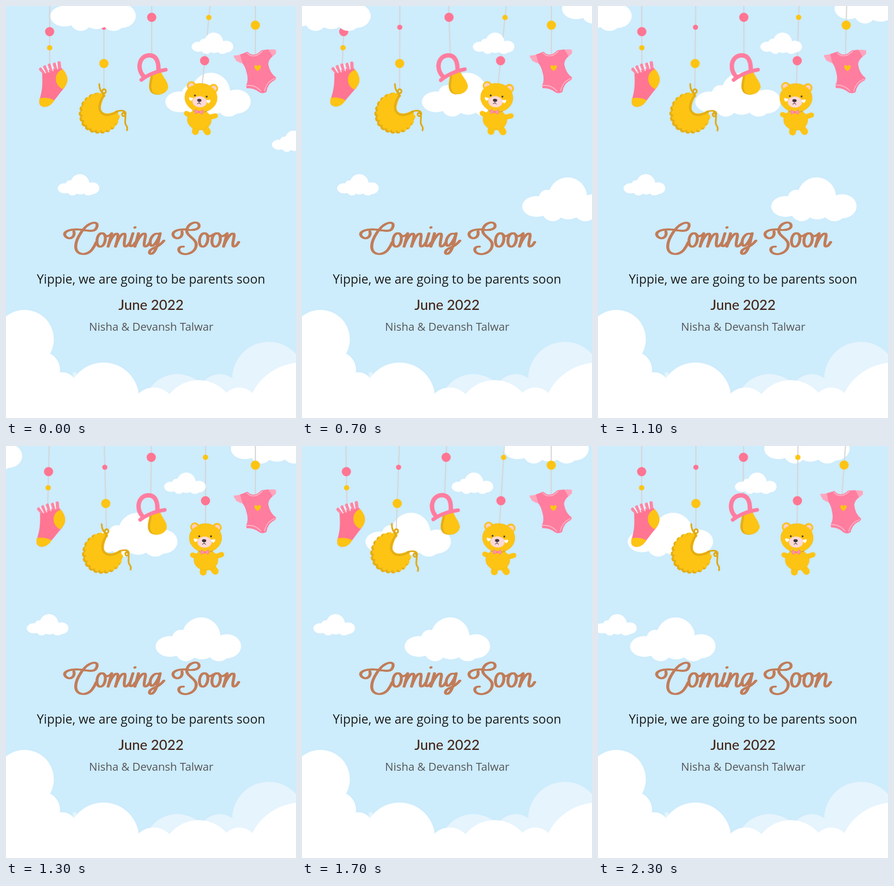
Recreate the animation shown at these times as an HTML page. Size 628 by 892 pixels, loop 2.4 s.

```html
<!DOCTYPE html>
<html lang="en">
<head>
<meta charset="utf-8">
<title>Coming Soon</title>
<style>
  html, body { margin: 0; width: 100%; height: 100%; overflow: hidden; background: #cdecfc; }
  svg { display: block; width: 628px; height: 892px; }
  text { font-family: "Open Sans", "Noto Sans", sans-serif; font-weight: 500; text-anchor: middle; }

  .white { fill: #fff; }
  .haze { fill: #e5f4fd; }
  .pink { fill: #ff7592; }
  .rose { fill: #ff7d9f; }
  .blush { fill: #ffa5bd; }
  .gold { fill: #fdc414; }
  .amber { fill: #e4ae15; }
  .line { fill: none; stroke-linecap: round; stroke-linejoin: round; }
  .string { stroke: #d5d5d6; stroke-width: 2.4; }
  .script { stroke: #c17c59; stroke-width: 3.8; }

  .drift { animation: drift 2400ms steps(24) infinite; }
  @keyframes drift { to { transform: translateX(var(--d)); } }

  .blink { animation: blink 2400ms step-end infinite; }
  @keyframes blink { 0% { opacity: 1; } 4.166%, 100% { opacity: 0; } }

  .toy { transform-origin: var(--pivot); animation: swing 2400ms infinite; }
  @keyframes swing {
    0%      { transform: rotate(var(--a0)); animation-timing-function: steps(3); }
    12.5%   { transform: rotate(var(--a1)); animation-timing-function: steps(4); }
    29.166% { transform: rotate(var(--a2)); animation-timing-function: steps(2); }
    37.5%   { transform: rotate(var(--a3)); animation-timing-function: steps(4); }
    54.166% { transform: rotate(var(--a4)); animation-timing-function: steps(4); }
    70.833% { transform: rotate(var(--a5)); animation-timing-function: steps(6); }
    95.833%, 100% { transform: rotate(var(--a6)); }
  }
  #sock     { --pivot: 94.5px -40px; --a0: 0deg; --a1: 5.1deg; --a2: 2.5deg; --a3: -1.8deg; --a4: 1.4deg; --a5: -.95deg; --a6: 0deg; }
  #bib      { --pivot: 212px -30px; --a0: 0deg; --a1: -1.95deg; --a2: .2deg; --a3: 2.8deg; --a4: -1.5deg; --a5: 2.15deg; --a6: 0deg; }
  #pacifier { --pivot: 315.5px -60px; --a0: 0deg; --a1: -1.95deg; --a2: -1.95deg; --a3: -1deg; --a4: .65deg; --a5: 2.3deg; --a6: .35deg; }
  #bear     { --pivot: 432px 99px; --a0: 5.6deg; --a1: 7.7deg; --a2: 5.9deg; --a3: 3.8deg; --a4: 0deg; --a5: 3.5deg; --a6: .6deg; }
  #onesie   { --pivot: 540px -60px; --a0: 0deg; --a1: -1.9deg; --a2: 0deg; --a3: 2.9deg; --a4: 0deg; --a5: .15deg; --a6: 4deg; }
</style>
</head>
<body>
<svg viewBox="0 0 628 892">
  <defs>
    <g id="cloud" class="white">
      <ellipse cx="31" cy="63" rx="31" ry="22.5"/>
      <circle cx="54" cy="45" r="18"/>
      <ellipse cx="98.5" cy="43" rx="42" ry="43"/>
      <ellipse cx="154" cy="62.5" rx="31" ry="26"/>
      <ellipse cx="66" cy="70" rx="24" ry="25"/>
      <ellipse cx="100" cy="65" rx="30" ry="26"/>
      <ellipse cx="137" cy="68" rx="27" ry="27"/>
    </g>
    <use id="puff" href="#cloud" transform="scale(.487)"/>
    <path id="heart" d="M0 7C-4 4-7 1-7-3C-7-7-1-7 0-3C1-7 7-7 7-3C7 1 4 4 0 7Z"/>
    <path id="frill" class="line" stroke-dasharray="0 11" d="M207 195C190 190 166 203 164 233C165 260 184 271 204 270C224 270 239 256 239 236"/>
    <path id="o" d="M208 492C195 492 193 521 204 521C216 521 220 492 208 492M213 495Q219 502 228 494"/>
    <path id="n" d="M287 492L279 521C285 504 295 490 301 493C305 497 296 515 300 520Q305 523 312 511"/>
    <g id="lettering">
      <path d="M147 488C150 500 139 507 130 500C120 490 136 482 160 484C180 487 191 489 195 482C200 473 197 468 188 469.500C170 473 150 505 151 522C152 539 172 541 184 530Q191 522 195 512"/>
      <use href="#o"/>
      <path d="M229 492L221 521C226 505 235 491 241 493C245 496 240 510 237 521C243 504 250 491 257 493C261 497 253 514 257 520Q262 523 269 511"/>
      <path d="M275 492L269 511C266 522 272 524 280 512M279 480L279.500 479"/>
      <use href="#n"/>
      <path d="M332 494C320 488 309 506 313 517C318 526 330 506 334 492C330 510 326 530 317 536C308 539 308 529 320 524Q333 519 342 508"/>
      <path d="M381 488C384 500 372 507 364 500C355 489 372 482 392 484C409 487 420 482 418 474C415 464 397 469 392 482C387 498 412 502 412 517C411 533 393 540 381 536C370 531 373 520 384 521"/>
      <use href="#o" x="222"/>
      <use href="#o" x="249"/>
      <use href="#n" x="192"/>
    </g>
  </defs>

  <!-- clouds behind the toys -->
  <use class="drift" href="#cloud" x="345" y="144.5" style="--d:-293px"/>
  <use class="drift" href="#cloud" x="652" y="-57" style="--d:-305px"/>
  <use class="drift" href="#cloud" x="655" y="371" style="--d:-611px"/>
  <use class="drift" href="#puff" x="112" y="364" style="--d:-123.5px"/>
  <use class="blink" href="#puff" x="576" y="269.5"/>

  <g id="sock" class="toy">
    <path class="line string" d="M94.5-50V128"/>
    <circle class="pink" cx="94.5" cy="55.5" r="10"/>
    <circle class="gold" cx="94.5" cy="90.5" r="5.8"/>
    <path class="pink" d="M78 143L118 132Q131 144 133 157C134 168 126 178 118 187Q105 204 99 211Q91 219 82 218.500Q72 217 72 208C74 192 81 186 78 143Z"/>
    <path class="line" stroke="#ff86a4" stroke-width="7" d="M75 137L81 143M84 132L89 141M94 128L98 138M105 126L108 135M115 123L116 133"/>
    <path class="line" stroke="#fff" stroke-width="1.800" d="M79 135L86 145M88 131L93 143M98 127L102 140M109 124L112 136"/>
    <path class="gold" d="M72.500 200Q88 196 105 204Q96 219 82 218.500Q72 217 72 208Z"/>
    <path class="gold" d="M123 137C108 142 104 159 112 171Q116 177 123 180Q134 169 133 157Q131 145 123 137Z"/>
  </g>

  <g id="bib" class="toy">
    <path class="line string" d="M212-40V181"/>
    <circle class="pink" cx="212" cy="46" r="5.6"/>
    <circle class="gold" cx="212" cy="124.500" r="10"/>
    <use href="#frill" stroke="#e4ae15" stroke-width="13"/>
    <use href="#frill" stroke="#fdc414" stroke-width="10" x="3" y="-2"/>
    <path class="gold" d="M213 191C200 187 188 191 182 198C168 203 164 218 167 235C168 252 178 266 193 267C205 270 217 269 225 263C236 257 242 249 242 238Q245 229 240 226C226 234 212 236 206 225C204 212 212 202 213 191Z"/>
    <path class="line" stroke="#e4ae15" stroke-width="5" d="M211 195C204 206 200 218 204 227C210 239 226 238 240 229"/>
    <path class="line" stroke="#dfa914" stroke-width="3.600" d="M202 169C202 180 207 189 212 189C218 188 217 180 212 180C206 182 209 190 213 195M238 229C253 223 263 229 258 237C253 242 248 233 254 231C264 235 254 251 260 258Q264 263 262 269"/>
  </g>

  <g id="pacifier" class="toy">
    <path class="line string" d="M315.500-70V104"/>
    <circle class="pink" cx="315.500" cy="24.500" r="10"/>
    <path class="amber" d="M313 152C311 165 306 178 315 188C327 197 350 190 351 175C350 162 340 155 336 143Z"/>
    <path class="gold" d="M318 151C317 165 311 176 319 188C331 195 350 189 351 175C350 162 340 155 336 143Z"/>
    <path class="line" stroke="#ff7d9f" stroke-width="9.500" d="M299 153C283 138 287 110 308 107C326 105 331 122 330 140"/>
    <path class="line" stroke="#ff7d9f" stroke-width="8" d="M293 160Q315 143 346 138"/>
  </g>

  <g id="bear" class="toy">
    <path class="line string" d="M432-90V170"/>
    <circle class="gold" cx="432" cy="24.500" r="5.800"/>
    <circle class="pink" cx="432" cy="118.500" r="10"/>
    <g class="gold" stroke="#f0ba1b" stroke-width="1">
      <circle cx="409" cy="175.500" r="9.500"/>
      <circle cx="457" cy="176.500" r="9.500"/>
      <path class="line" stroke="#fdc414" stroke-width="11" d="M404 236L418 241M467 235L450 241"/>
      <path class="line" stroke="#fdc414" stroke-width="15" d="M428 262L427 273M446 262L453 271"/>
      <ellipse cx="433" cy="247" rx="26" ry="22"/>
      <ellipse cx="432" cy="199" rx="35" ry="31"/>
    </g>
    <circle cx="408.500" cy="175" r="6" fill="#ffcfc6"/>
    <circle cx="457.500" cy="176.500" r="6" fill="#ffcfc6"/>
    <path class="gold" d="M400 187Q404 173 432 169Q460 172 465 187Z"/>
    <ellipse cx="430" cy="208" rx="15.500" ry="12" fill="#fcd9d8"/>
    <g fill="#40353a">
      <circle cx="418.500" cy="195.500" r="2"/>
      <circle cx="444" cy="195.500" r="2"/>
      <ellipse cx="429" cy="205" rx="4.600" ry="3.200"/>
    </g>
    <path class="line" stroke="#40353a" stroke-width="1.200" d="M429 207V211M425.500 213Q427 211 429 211Q431 211 432.500 213"/>
    <use class="white" href="#heart" transform="translate(410.500 204) rotate(8) scale(.62)"/>
    <use class="white" href="#heart" transform="translate(449 205.500) rotate(-8) scale(.62)"/>
    <path class="line" stroke="#b98a20" stroke-width="1" d="M416 228Q432 234 448 227"/>
    <path fill="#ff93ad" stroke="#e8718f" stroke-width=".7" d="M431 230L423 225Q420 230 423 235L431 231L438 235Q441 230 438 224Z"/>
    <circle class="pink" cx="430.500" cy="230" r="2.300"/>
  </g>

  <g id="onesie" class="toy">
    <path class="line string" d="M540-70V108"/>
    <circle class="gold" cx="540" cy="41.500" r="10"/>
    <path class="blush" d="M510 104Q501 108 493 107Q494 113 497 115Q498 120 502 120Q506 124 514 124ZM566 95Q576 93 585 95Q584 100 585 102Q581 106 579 108Q574 110 570 114Z"/>
    <path class="rose" d="M507 105L523 99Q537 113 553 96L568 94Q574 103 577 109Q568 117 568 126Q571 145 585 155L583 160Q567 167 564 186Q556 191 549 187Q537 177 521 178L520 172Q526 160 521 144Q518 131 512 124Z"/>
    <path class="line" stroke="#ffb9ca" stroke-width="1.800" d="M521 172Q539 170 552 184M560 184Q564 164 582 157M522 102Q537 116 555 98"/>
    <use class="gold" href="#heart" x="545" y="134"/>
  </g>

  <!-- clouds in front of the toys -->
  <use class="drift" href="#cloud" x="96" y="-41" style="--d:-454px"/>
  <use class="drift" href="#puff" x="402" y="57.500" style="--d:-110px"/>

  <g class="haze">
    <circle cx="569" cy="806" r="79"/>
    <circle cx="463" cy="843" r="46"/>
    <circle cx="371" cy="870" r="73"/>
    <path d="M145 793H152L154 802L145 808Z"/>
  </g>
  <g class="white">
    <circle cx="40" cy="721.500" r="63.500"/>
    <circle cx="77" cy="788" r="40"/>
    <circle cx="122" cy="824" r="31"/>
    <circle cx="211" cy="849" r="77"/>
    <circle cx="320" cy="873" r="47"/>
    <circle cx="417" cy="890" r="80"/>
    <circle cx="505" cy="866" r="40"/>
    <circle cx="640" cy="891" r="119"/>
    <path d="M0 722H50V790H110V846H628V892H0Z"/>
  </g>

  <!-- side-by-side strokes give the broad-nib contrast -->
  <g class="line script" role="img" aria-label="Coming Soon">
    <use href="#lettering" x="-1.300"/>
    <use href="#lettering"/>
    <use href="#lettering" x="1.300"/>
  </g>

  <text x="314" y="601" font-size="27" fill="#1b1b1d">Yippie, we are going to be parents soon</text>
  <text x="314" y="658" font-size="30.500" fill="#46271c" style="font-family: Lato, sans-serif">June 2022</text>
  <text x="314.500" y="703" font-size="24" fill="#555659">Nisha &amp; Devansh Talwar</text>
</svg>
</body>
</html>
```
